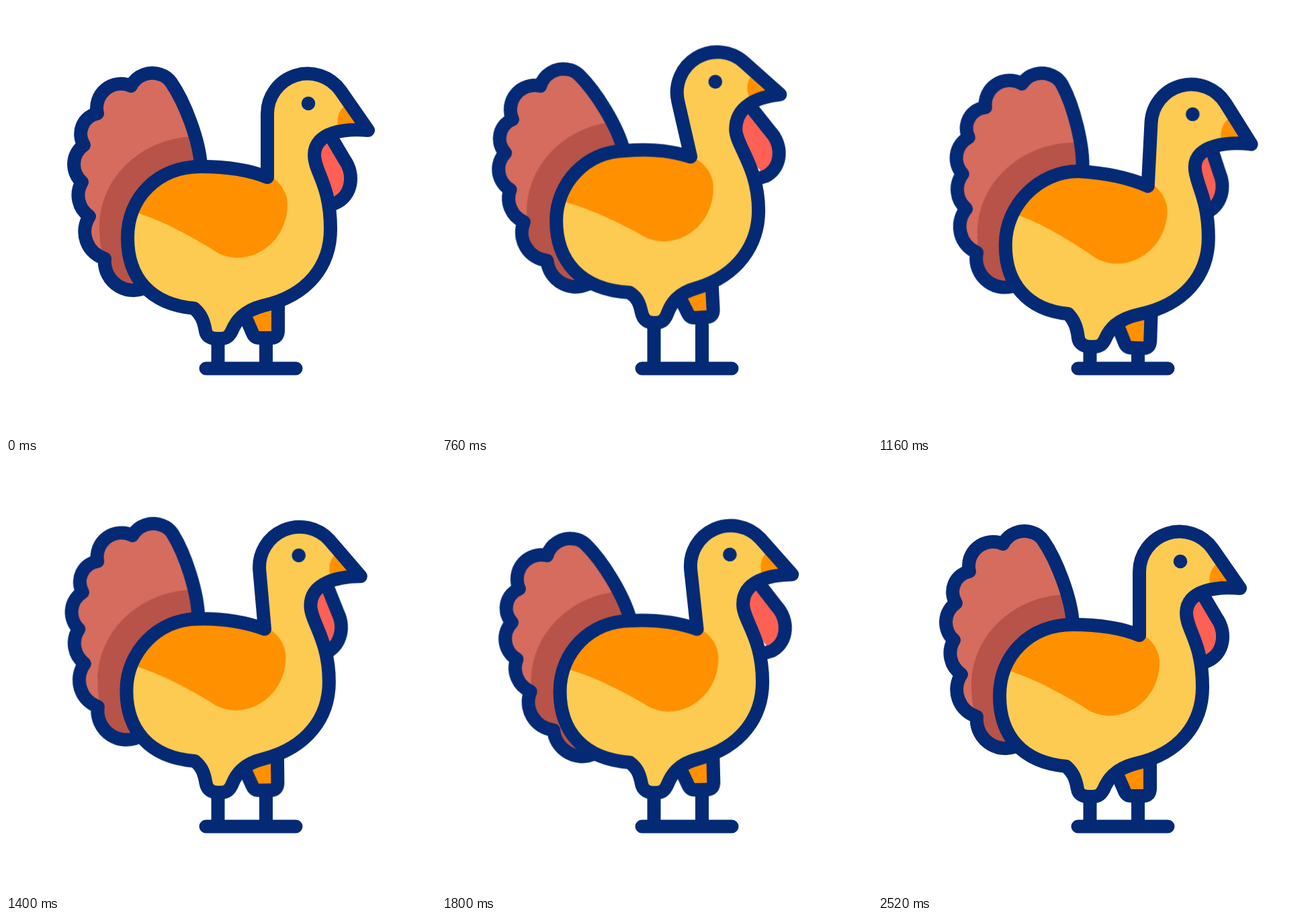
An HTML page without scripts for the animation above (2.6 s loop, 640 by 640 pixels).

```html
<!DOCTYPE html>
<html lang="en">
<head>
<meta charset="utf-8">
<title>Turkey</title>
<style>
  html, body { margin: 0; width: 100%; height: 100%; overflow: hidden; background: #fff; }
  svg { display: block; width: 100vw; height: 100vh; }

  .line { fill: none; stroke: #042a75; stroke-width: 20; stroke-linecap: round; stroke-linejoin: round; }
  .yellow { fill: #fdcb51; }
  .orange { fill: #ff9100; }
  .red { fill: #ff6054; }
  .plume { fill: #d56c5e; }
  .dark { fill: #b75348; }
  .navy { fill: #042a75; }

  .hop, .lean, .body, .fan, .dangle {
    animation: 2.6s cubic-bezier(.37, 0, .63, 1) infinite;
  }
  .hop { animation-name: hop; }
  .lean { animation-name: lean; }
  .fan { animation-name: fan; transform-origin: 296px 235px; --turn: 1deg; }
  .level { --turn: -1deg; }
  .dangle { animation-name: dangle; transform-origin: 470px 195px; }

  /* --back and --front are the two ends of each part's lean */
  .head { transform-origin: 449px 161px; --back: translate(-40px, -7px) rotate(-13deg); --front: translate(18px, 4px) rotate(3.3deg); }
  .wing { transform-origin: 350px 340px; --back: translate(-13px, 1px) rotate(-3deg); --front: translate(10px, -3px) rotate(2.5deg); }
  .thigh { transform-origin: 386px 490px; --back: translate(-1px, -5px) rotate(-3deg); --front: translate(0, 3px) rotate(2deg); }
  .tail { --back: translate(-20px, 3px); --front: translate(15px, -4px); }
  .shade { --back: translate(7px, 0); --front: translate(-6px, 1px); }
  .wattle { --back: translate(-20px, -12px); --front: translate(13px, 2px); }

  .body {
    --rest: path("M389 255 L389 161 A60 60 0 0 1 498 126 L539 185 C505 182 459 187 459 222 C459 247 483 265 483 332 C483 386 450 431 383 446 C352 454 342 470 336 484 C332 492 328 495 320 495 L313 495 C303 495 298 490 297 484 C294 467 290 459 280 450 C215 444 181 405 181 345 C181 285 226 239 290 239 C325 239 362 244 389 255 Z");
    --back: path("M370 250 L351 168 A60 60 0 0 1 449 109 L503 157 C468 161 437 175 437 209 C437 233 471 265 471 330 C471 380 441 426 380 445 C350 453 341 469 336 482 C332 493 328 496 320 497 L313 497 C303 496 299 490 297 482 C294 467 290 459 279 452 C205 448 170 404 170 345 C170 290 214 242 272 241 C320 237 345 243 370 250 Z");
    --front: path("M402 256 L407 162 A60 60 0 0 1 518 133 L556 194 C522 190 472 194 472 228 C472 252 492 272 492 333 C492 388 457 433 388 447 C355 454 344 470 338 484 C334 492 330 495 321 495 L314 495 C304 494 299 489 298 482 C296 465 292 456 283 446 C222 440 189 400 190 342 C190 285 240 233 299 234 C335 236 372 243 402 256 Z");
    d: var(--rest);
    animation-name: bend;
  }

  @keyframes hop {
    0%, 7.7%, 95.4%, 100% { transform: none; }
    18.46%, 46.15%, 76.9% { transform: translateY(13px); }
    30.77%, 61.54% { transform: translateY(-27px); }
  }
  @keyframes lean {
    0%, 18.46%, 76.9%, 100% { transform: none; }
    30%, 61.54% { transform: var(--back); }
    45.6% { transform: var(--front); }
  }
  @keyframes bend {
    0%, 18.46%, 76.9%, 100% { d: var(--rest); }
    30%, 61.54% { d: var(--back); }
    45.6% { d: var(--front); }
  }
  @keyframes fan {
    0%, 7.7%, 95.4%, 100% { transform: rotate(0deg); }
    18.46%, 81.9% { transform: rotate(calc(5.4 * var(--turn))); }
    30% { transform: rotate(calc(-11 * var(--turn))); }
    47.7% { transform: rotate(calc(7.6 * var(--turn))); }
    66.4% { transform: rotate(calc(-12.2 * var(--turn))); }
  }
  @keyframes dangle {
    0%, 7.7%, 95.4%, 100% { transform: rotate(0deg); }
    18.46%, 81.9% { transform: rotate(7deg); }
    30%, 66.9% { transform: rotate(-8deg); }
    47.7% { transform: rotate(14deg); }
  }
</style>
</head>
<body>
<svg viewBox="0 0 640 640">
  <defs>
    <path id="feathers" d="M290 238C288 200 266 143 246 114Q240 105 230 102A36 36 0 0 0 186 119A36 36 0 0 0 136 160A31 31 0 0 0 116 207A35 35 0 0 0 113 262A38 38 0 0 0 124 313A42 42 0 0 0 147 376A43 43 0 0 0 215 415"/>
    <clipPath id="inside"><path d="M290 238C288 200 266 143 246 114L100 114V380L147 376A43 43 0 0 0 215 415L290 380Z"/></clipPath>
    <clipPath id="edge"><use href="#feathers"/></clipPath>
  </defs>

  <path class="line" d="M297.5 539.5H431.5M315.5 475V539.5M387 475V539.5"/>

  <g class="hop">
    <g class="lean thigh">
      <path class="orange" d="M405 430V483Q405 494 395 494H377Q370 494 367 487L355 460V430Z"/>
      <path class="line" d="M405 440V483Q405 494 395 494H377Q370 494 367 487L356 462"/>
    </g>

    <g class="lean tail">
      <g class="fan">
        <use href="#feathers" class="plume"/>
        <g clip-path="url(#edge)">
          <!-- the shade keeps level while the feathers turn -->
          <g class="fan level">
            <path class="lean shade dark" d="M310 193L285 194C205 194 139 253 139 330Q139 352 144 374V450H310Z"/>
          </g>
        </g>
        <use href="#feathers" class="line"/>
      </g>
    </g>

    <g class="lean wattle">
      <g class="dangle">
        <path class="red" d="M455 200L484 195L504 229C519 250 516 283 489 294L455 250Z"/>
        <path class="line" d="M478 185L504 229C519 250 516 283 489 294L477 296"/>
      </g>
    </g>

    <path class="body yellow"/>
    <path class="lean wing orange" d="M190 306C235 320 275 343 305 361C350 396 419 360 419 295C419 280 411 266 398 256L389 255C362 244 325 239 290 239C245 239 205 262 190 306Z"/>
    <path class="lean head orange" d="M505 148C495 156 492 166 494 180L539 185Z"/>
    <path class="body line"/>
    <circle class="lean head navy" cx="450" cy="145" r="10.3"/>
  </g>
</svg>
</body>
</html>
```
